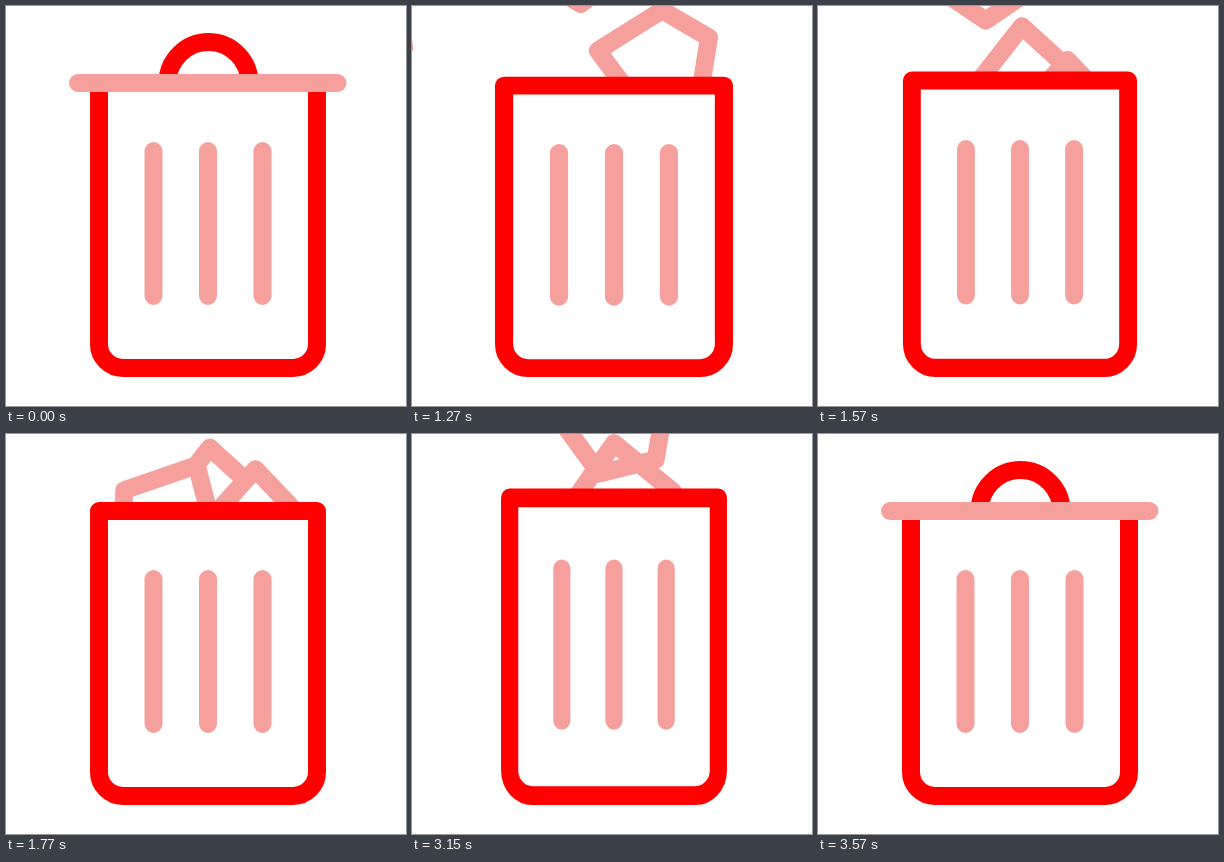
Write an HTML page that moves like this. It is 400 by 400 pixels and loops after 3600 ms.

```html
<!DOCTYPE html>
<html lang="en">
<head>
<meta charset="utf-8">
<title>Bin</title>
<style>
  html, body { margin: 0; width: 100%; height: 100%; overflow: hidden; background: #fff; }
  svg { display: block; width: 100%; height: 100%; }
  path { fill: none; stroke-width: 18; stroke-linecap: round; stroke-linejoin: round; }
  .red { stroke: #f00; }
  .pink { stroke: #f5a09c; }
  #bin .red, .settled path { fill: #fff; }
</style>
</head>
<body>
<svg viewBox="0 0 400 400">
  <g id="papers"></g>
  <g id="bin">
    <path class="red" d="M93 77V338a24 24 0 0 0 24 24H287a24 24 0 0 0 24-24V77z"/>
    <path class="pink" d="M147.5 145V290M202 145V290M256.5 145V290"/>
  </g>
  <g id="lid">
    <path class="red" d="M161.5 77a41 41 0 0 1 82 0"/>
    <path class="pink" d="M72 77H331.5"/>
  </g>
</svg>
<script>
const LOOP = 3600, OPEN = 995, CLOSED = 3570, SPAN = 775;
const FLOOR = 371, FALL = 150;
const $ = id => document.getElementById(id);

// time and horizontal scale of the bin
const squash = [[215, 1], [370, 1.025], [435, 0.946], [690, 1.025], [745, 1]];

// each paper falls from one pose to its place in the bin: x, y, angle
const papers = [
  { from: [251, 55, 0], to: [211, 79, 75] },
  { from: [209, -11, 2], to: [252, 101, 79] },
  { from: [169, -41, -20], to: [161, 90, 108] }
];

for (const paper of papers) {
  paper.el = document.createElementNS("http://www.w3.org/2000/svg", "path");
  paper.el.setAttribute("d", "M-65-10L-1-51L46-24L37 36L-19 51z");
  paper.el.setAttribute("class", "pink");
  $("papers").append(paper.el);
}

const clamp = (v, lo = 0, hi = 1) => Math.min(hi, Math.max(lo, v));
const mix = (a, b, u) => a + (b - a) * u;
const smooth = u => (1 - Math.cos(Math.PI * clamp(u))) / 2;
const place = (el, transform) => el.setAttribute("transform", transform);

function widthAt(s) {
  return squash.reduce(([t, w], [next, goal]) =>
    [next, mix(w, goal, smooth((s - t) / (next - t)))])[1];
}

function paperPose({ from, to }, i, s, sy) {
  const k = (s - 275) / FALL - i;
  const [x, y, angle] = from;
  if (k < 0) return [x + 42 * k, y - 46 * k * k, angle + 24 * k];

  // pressed down until the last paper lands, and stretched with the bin
  const dip = (9 + 12 * i) * (1 - smooth((s - 575) / 175));
  const rest = FLOOR - (FLOOR - to[1]) * sy + dip;
  const u = Math.min(k, 1);
  return [mix(x, to[0], u), mix(y, rest, u), mix(angle, to[2], u)];
}

function draw(now) {
  const t = now % LOOP;
  // closing runs the opening backwards
  const s = clamp(t < 2200 ? t - OPEN : CLOSED - t, 0, SPAN);

  const sx = widthAt(s);
  const sy = 1 - 1.05 * (sx - 1);
  place($("bin"), `translate(202 ${FLOOR}) scale(${sx} ${sy}) translate(-202 ${-FLOOR})`);

  const turn = (s / 275) ** 1.5, slide = turn * turn;
  place($("lid"), `translate(${-79 * slide} ${-35 * slide}) rotate(${-98 * Math.min(turn, 1.3)} 72 77)`);

  papers.forEach((paper, i) => {
    const [x, y, angle] = paperPose(paper, i, s, sy);
    place(paper.el, `translate(${x} ${y}) rotate(${angle})`);
  });
  // papers at rest cover each other
  $("papers").classList.toggle("settled", s > 700);
}

const start = performance.now();
function tick() {
  draw(performance.now() - start);
  requestAnimationFrame(tick);
}
tick();
</script>
</body>
</html>
```
